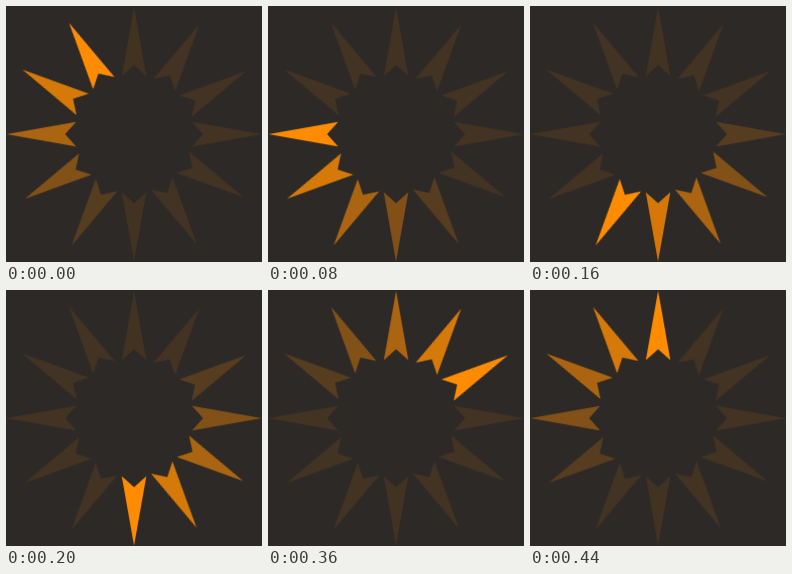
An HTML page for the animation above (480 ms loop, 256x256 px).

```html
<!DOCTYPE html>
<html lang="en">
<head>
<meta charset="utf-8">
<title>Spinner</title>
<style>
  html, body { margin: 0; width: 100%; height: 100%; overflow: hidden; background: #2d2926; }
  svg { display: block; width: 100vw; height: 100vh; }
</style>
</head>
<body>
<svg viewBox="0 0 256 256">
  <g id="rays" fill="#ff8c00" transform="translate(128.1 128.2)"></g>
</svg>
<script>
  const COUNT = 12, LOOP = 480;
  const rays = document.getElementById('rays');

  // Opacity of a ray that is k places along the trail from the brightest one.
  const glow = k => Math.max(0.1, 1 - 0.2 * k);

  for (let i = 0; i < COUNT; i++) {
    const angle = i * 360 / COUNT;
    // Diagonal rays sit slightly off the common centre.
    const skew = Math.sin(angle * Math.PI / 90);
    const ray = document.createElementNS('http://www.w3.org/2000/svg', 'path');
    ray.setAttribute('d', 'M0-127.5L12.3-58L0-69L-12.3-58Z');
    ray.setAttribute('transform', `translate(${1.5 * skew} ${skew}) rotate(${angle})`);
    rays.append(ray);

    const steps = Array.from({ length: COUNT + 1 }, (_, n) => ({
      opacity: glow((2 * COUNT - 1 - n - i) % COUNT),
      offset: n / COUNT,
      easing: 'steps(1, end)'
    }));
    ray.animate(steps, { duration: LOOP, iterations: Infinity });
  }
</script>
</body>
</html>
```
